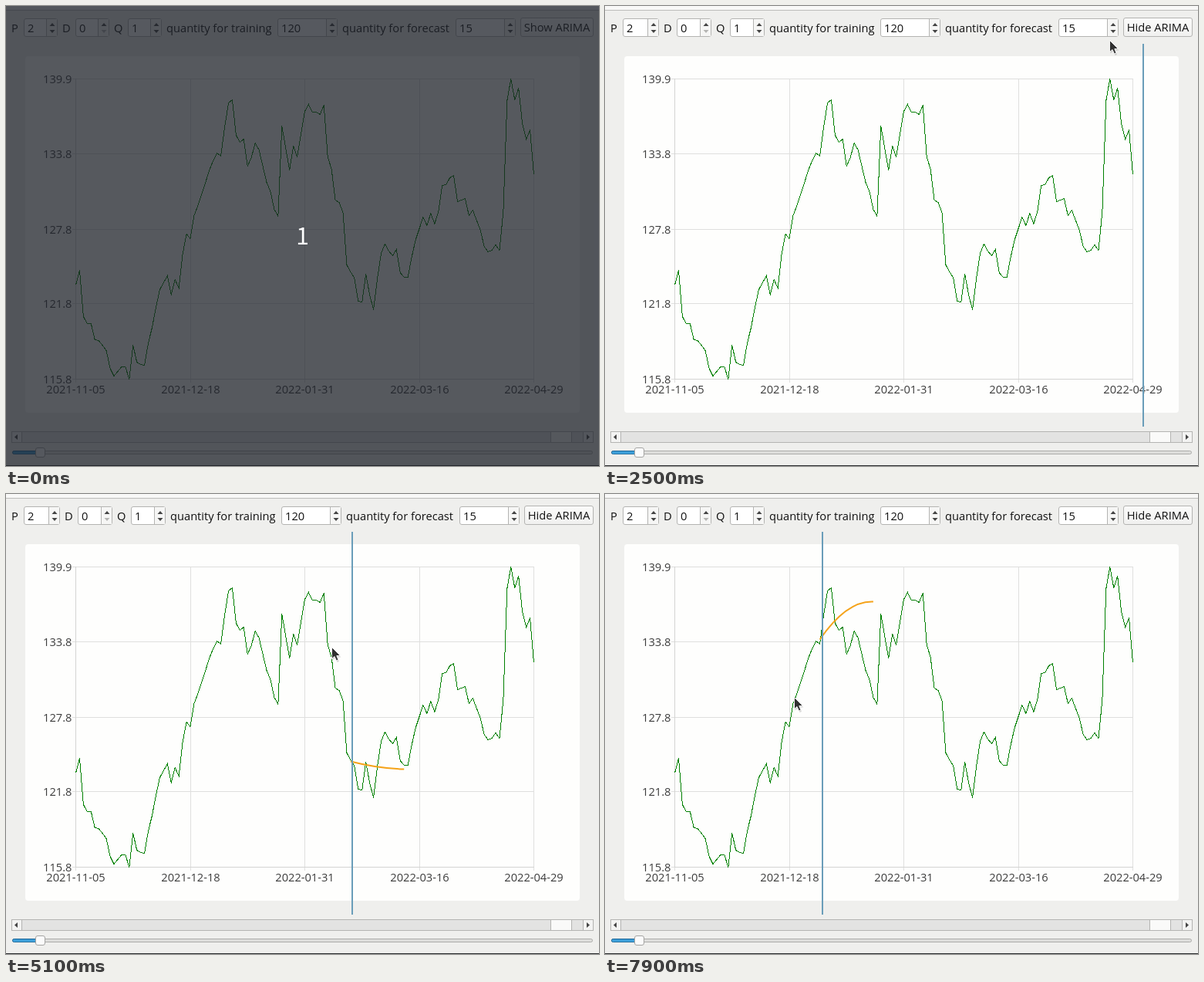
Write an HTML page that moves like this. It is 769 px wide and 596 px high and loops after 8000 ms.

```html
<!DOCTYPE html>
<html lang="en">
<head>
<meta charset="utf-8">
<title>Forecast chart</title>
<style>
html, body { margin: 0; width: 100%; height: 100%; overflow: hidden; background: #efefed; }
svg { display: block; width: 769px; height: 596px; }
text { font: 14.67px "Open Sans", "Noto Sans", sans-serif; fill: #111; white-space: pre; }
.axis text { fill: #3c3c3c; }
.crisp { shape-rendering: crispEdges; }
.frame { stroke: #b4b4b2; }
#count { font: 30px "Noto Sans CJK SC", "Noto Sans CJK JP", "DejaVu Sans", sans-serif; fill: #fff; }
</style>
</head>
<body>
<svg id="stage" viewBox="0 0 769 596">
  <defs>
    <linearGradient id="face" x2="0" y2="1"><stop stop-color="#fbfbfa"/><stop offset="1" stop-color="#f0f0ef"/></linearGradient>
    <linearGradient id="blue" x2="0" y2="1"><stop stop-color="#2f8fcb"/><stop offset="1" stop-color="#48afe8"/></linearGradient>
  </defs>
  <rect width="769" height="596" fill="#efefed"/>
  <rect width="769" height="5" fill="#f8f8f7"/>
  <path class="crisp" d="M0 5.5H769" stroke="#bdbdbb"/>
  <rect x="25" y="65" width="719" height="462" rx="4" fill="#fefefd"/>
  <g id="barShow"></g>
  <g id="barHide"></g>
  <g id="axis" class="axis"></g>
  <polyline id="series" class="crisp" fill="none" stroke="#008000"/>

  <g class="frame">
    <rect x="7.5" y="551.5" width="754" height="14" fill="#f3f3f2"/>
    <rect x="20.5" y="551.5" width="728" height="14" fill="#e3e3e2"/>
    <rect x="706.5" y="551.5" width="27" height="14" fill="#fafaf9"/>
  </g>
  <path d="M15 555V562L11 558.5ZM753 555V562L757 558.5Z" fill="#444"/>
  <rect x="8.5" y="576.5" width="752" height="4" rx="2" fill="#dededc" stroke="#adadab"/>
  <rect x="8.5" y="576.5" width="36" height="4" rx="2" fill="url(#blue)" stroke="#286f9e"/>
  <rect x="38.5" y="572.5" width="12" height="12" rx="2.5" fill="#fbfbfb" stroke="#a5a5a3"/>
  <rect y="595" width="769" height="1" fill="#2a2c2e"/>

  <path id="forecast" fill="none" stroke="#f5a31a" stroke-width="2"/>
  <rect id="marker" y="49" width="2" height="496" fill="#6a9db9"/>
  <g id="cursor">
    <path d="M1 2V17L4.5 14 7 19.500 9.500 18.500 7.500 13H12Z" fill="#000" opacity=".15"/>
    <path d="M0 0V15L3.500 12 6 17.500 8.500 16.500 6.300 11H11Z" fill="#303030" stroke="#fff" stroke-width=".9"/>
  </g>
  <g id="countdown">
    <rect width="769" height="596" fill="#1e222a" fill-opacity=".75"/>
    <text id="count" x="384.500" y="309" text-anchor="middle">1</text>
  </g>
</svg>
<script>
const $ = id => document.getElementById(id);
const LOOP = 8000, TICK = 100;
const LEFT = 90, STEP = 4.95, HORIZON = 14;

const prices = [
  361, 342, 402, 411, 411, 432, 433, 439, 446, 469, 479, 473, 467, 467, 483, 439, 461, 464, 465, 436,
  416, 390, 367, 358, 349, 374, 354, 365, 321, 295, 301, 271, 258, 243, 228, 212, 200, 190, 194, 157,
  125, 121, 167, 176, 172, 207, 196, 177, 186, 207, 228, 240, 263, 272, 155, 184, 212, 181, 195, 165,
  136, 127, 137, 137, 140, 128, 195, 211, 251, 254, 267, 335, 344, 352, 382, 383, 347, 374, 393, 353,
  320, 308, 317, 323, 315, 345, 351, 351, 325, 303, 288, 273, 284, 268, 282, 266, 232, 231, 222, 219,
  253, 251, 249, 271, 264, 277, 290, 311, 318, 316, 309, 316, 266, 122, 94, 121, 106, 152, 172, 160, 218
];

const text = (x, y, s, anchor = 'start') => `<text x="${x}" y="${y}" text-anchor="${anchor}">${s}</text>`;

function spinBox(x, right, value) {
  const c = right - 7;
  const down = value === 0 ? '#b5b5b3' : '#444';
  return `<rect class="frame" x="${x + .5}" y="16.5" width="${right - x - 1}" height="23" rx="2.500" fill="#fff"/>
    <rect x="${right - 14}" y="17" width="13" height="22" fill="#f6f6f5"/>
    <path class="crisp frame" d="M${right - 14.5} 17V39"/>
    <path d="M${c - 3.5} 26H${c + 3.5}L${c} 22Z" fill="#444"/>
    <path d="M${c - 3.5} 31H${c + 3.5}L${c} 35Z" fill="${down}"/>` + text(x + 5, 34, value);
}

function toolbar(fields, buttonX, caption) {
  return fields.map(([label, x, left, right, value]) => text(x, 34, label) + spinBox(left, right, value)).join('') +
    `<rect class="frame button" x="${buttonX + .5}" y="15.5" width="${761 - buttonX}" height="24" rx="2.500" fill="url(#face)"/>` +
    text((buttonX + 762) / 2, 33, caption, 'middle');
}

$('barShow').innerHTML = toolbar([
  ['P', 7, 23, 67, 2], ['D', 73, 90, 134, 0], ['Q', 140, 158, 202, 1],
  ['quantity for training', 208, 352, 430, 120], ['quantity for forecast', 436, 583, 661, 15]
], 667, 'Show ARIMA');
$('barHide').innerHTML = toolbar([
  ['P', 7, 23, 70, 2], ['D', 76, 93, 138, 0], ['Q', 144, 162, 207, 1],
  ['quantity for training', 213, 357, 435, 120], ['quantity for forecast', 441, 588, 666, 15]
], 672, 'Hide ARIMA');
const showButton = $('barShow').querySelector('.button');

const rows = [[94, '139.9'], [191, '133.8'], [289, '127.8'], [385, '121.8'], [483, '115.8']];
const columns = [[90, '2021-11-05'], [239, '2021-12-18'], [387, '2022-01-31'], [536, '2022-03-16'], [684, '2022-04-29']];
$('axis').innerHTML =
  `<path class="crisp" stroke="#dfdfde" fill="none" d="${
    rows.map(([y]) => `M86 ${y + .5}H685`).join('') + columns.map(([x]) => `M${x + .5} 94V488`).join('')}"/>` +
  '<path class="crisp" stroke="#d4d4d3" fill="none" d="M90.500 94V483.500H685"/>' +
  rows.map(([y, s]) => text(85.5, y + 6, s, 'end')).join('') +
  columns.map(([x, s]) => text(x + .5, 502, s, 'middle')).join('');

$('series').setAttribute('points', prices.map((y, i) => `${LEFT + i * STEP + .5},${y + .5}`).join(' '));

// Each key is [time, ...values]; values are interpolated linearly.
function track(keys, t) {
  const next = keys.findIndex(k => k[0] > t);
  if (next === 0) return keys[0].slice(1);
  if (next < 0) return keys[keys.length - 1].slice(1);
  const a = keys[next - 1], b = keys[next];
  const u = (t - a[0]) / (b[0] - a[0]);
  return a.slice(1).map((v, i) => v + (b[i + 1] - v) * u);
}

const cursorPath = [
  [700, 176, 1], [1000, 420, 20], [1300, 680, 30], [1500, 744, 24], [2300, 744, 24], [2500, 654, 44],
  [2800, 578, 105], [3200, 516, 158], [3400, 513, 165], [3500, 513, 165], [3600, 514, 165], [3700, 514, 165],
  [4500, 456, 192], [4600, 447, 194], [5300, 412, 200], [5400, 412, 200], [5700, 400, 202],
  [6300, 341, 212], [6800, 305, 219], [7200, 277, 234], [7700, 250, 258], [7800, 250, 258], [7900, 245, 263]
];
const markerPath = [
  [2500, 698], [3200, 614], [3400, 611], [3700, 611], [4500, 512], [4600, 486], [5300, 434],
  [5400, 434], [5700, 414], [6300, 386], [6800, 344], [7200, 316], [7700, 282]
];
// Start offset, rise at the horizon, bow at the middle.
const forecastShape = [
  [3400, 0, -8, -3], [4500, 0, -29, -4], [5100, 2, 10, 2], [5700, 5, 48, 5],
  [6300, 2, 24, 2], [6800, -1, -2, -4], [7200, -4, -28, -8], [7700, -6, -49, -13]
];

function forecastCurve(markerX, t) {
  const i = Math.floor((markerX - LEFT) / STEP);
  if (i >= prices.length) return '';
  const [offset, rise, bow] = track(forecastShape, t);
  const x = LEFT + i * STEP + .5, y = prices[i] + offset + .5, w = HORIZON * STEP;
  return `M${x} ${y}q${w / 2} ${rise / 2 + 2 * bow} ${w} ${rise}`;
}

function draw(t) {
  const show = (id, on) => $(id).style.display = on ? '' : 'none';
  const active = t >= 2100;
  show('countdown', t < 100);
  show('barShow', !active);
  show('barHide', active);
  show('marker', active);
  show('forecast', active);
  show('cursor', t >= 700);
  showButton.setAttribute('fill', t >= 2000 ? '#dadad8' : 'url(#face)');

  const [cx, cy] = track(cursorPath, t);
  $('cursor').setAttribute('transform', `translate(${Math.round(cx) + .5} ${Math.round(cy) + .5})`);
  const markerX = Math.round(track(markerPath, t)[0]);
  $('marker').setAttribute('x', markerX - 1);
  $('forecast').setAttribute('d', forecastCurve(markerX, t));
}

const start = performance.now();
let lastTick = -1;
function loop() {
  const tick = Math.floor(((performance.now() - start) % LOOP) / TICK);
  if (tick !== lastTick) draw(tick * TICK);
  lastTick = tick;
  requestAnimationFrame(loop);
}
loop();
</script>
</body>
</html>
```
